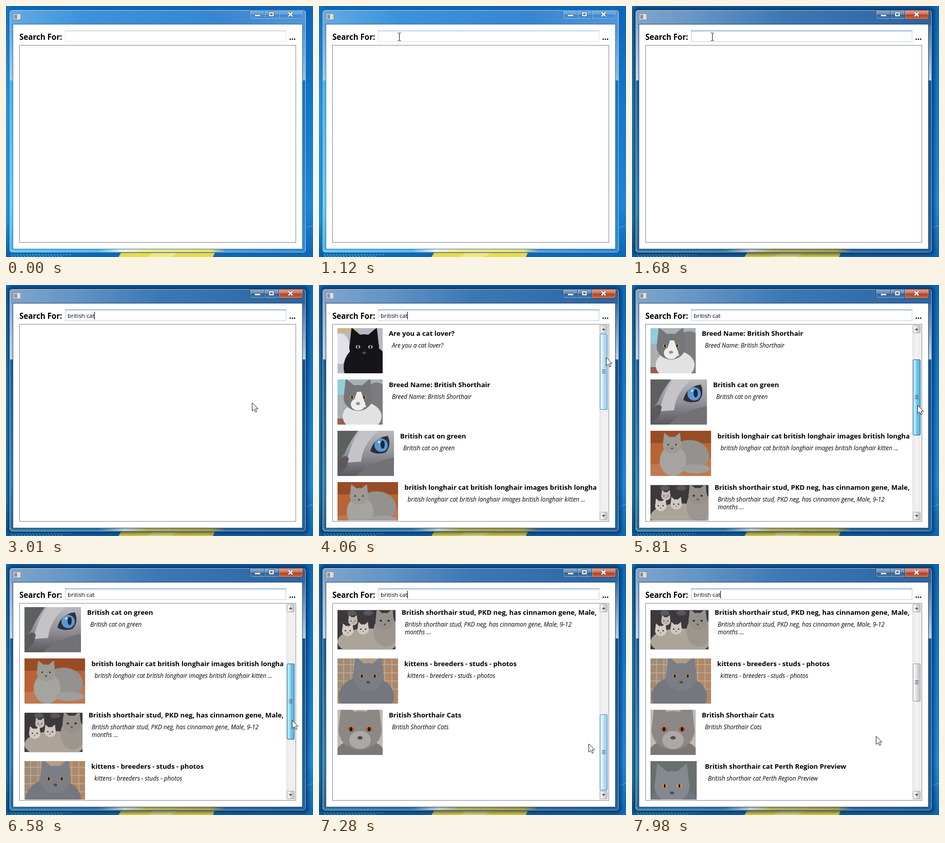
An HTML page that plays this animation: 598x489 px, repeating every 8 s.

```html
<!DOCTYPE html>
<html lang="en">
<head>
<meta charset="utf-8">
<title>Image search</title>
<style>
html, body { margin: 0; width: 100%; height: 100%; overflow: hidden; background: #1478c8; }
#stage { display: block; width: 598px; height: 489px; }
text { font-family: "Open Sans", "Noto Sans", sans-serif; white-space: pre; }
.label { font-weight: 700; font-size: 15.1px; }
.title { font-weight: 700; font-size: 13.15px; }
.note { font-style: italic; font-size: 11.75px; }
.query { font-size: 11.4px; }
</style>
</head>
<body>
<svg id="stage" viewBox="0 0 598 489"></svg>
<script>
const rect = (x, y, w, h, fill, more = '') =>
  `<rect x="${x}" y="${y}" width="${w}" height="${h}" fill="${fill}" ${more}/>`;
const box = (x, y, w, h, fill, stroke, more = '') =>
  rect(x + .5, y + .5, w - 1, h - 1, fill, `stroke="${stroke}" ${more}`);
const oval = (x, y, rx, ry, fill) =>
  `<ellipse cx="${x}" cy="${y}" rx="${rx}" ry="${ry}" fill="${fill}"/>`;
const path = (d, fill, more = '') => `<path d="${d}" fill="${fill}" ${more}/>`;
const text = (x, y, kind, s) => `<text x="${x}" y="${y}" class="${kind}">${s}</text>`;
const group = (id, body, more = '') => `<g id="${id}" ${more}>${body}</g>`;
// Gradient stops are written as "offset colour"; vertical unless across is set.
const grad = (id, stops, across) =>
  `<linearGradient id="${id}" x2="${across ? 1 : 0}" y2="${across ? 0 : 1}">` +
  stops.map(s => s.split(' ')).map(([o, c]) => `<stop offset="${o}" stop-color="${c}"/>`).join('') +
  '</linearGradient>';

const defs = '<defs>' +
  grad('desk', ['0 #0b66b8', '.3 #0f74c8', '.8 #1c86d8', '1 #0c66b4']) +
  grad('deskL', ['0 #1270bc', '.4 #2496de', '.85 #2090d4', '1 #0a5ca4']) +
  grad('idleTitle', ['0 #62ace4', '.25 #3d92da', '.7 #3886d0', '1 #5299da'], 1) +
  grad('liveTitle', ['0 #7fa5cc', '.2 #6596c6', '.5 #3c78b4', '1 #2a66a4'], 1) +
  grad('idleL', ['0 #5aa8e2', '.249 #9cd0f2', '.25 #3fb4ec', '.8 #5ed4f8', '1 #48b8ec']) +
  grad('idleR', ['0 #4c94d8', '.249 #8cc0ea', '.25 #1674c8', '1 #2a90de']) +
  grad('liveL', ['0 #86aed6', '.249 #bcd6ee', '.25 #14609e', '.8 #2a86b8', '1 #256f9c']) +
  grad('liveR', ['0 #3a72ae', '.249 #b8d4ee', '.25 #10549a', '1 #1c68ac']) +
  grad('idleB', ['0 #58ccf4', '.3 #4cb8ec', '.38 #e8f4e8', '.45 #f2ea88', '.68 #eee060', '.73 #4a9ad8', '1 #2a88d8'], 1) +
  grad('liveB', ['0 #2a7ca8', '.3 #2a78ac', '.39 #b8ccd0', '.46 #b0a850', '.68 #a09838', '.73 #2a68a4', '1 #1c60a4'], 1) +
  grad('red', ['0 #dca698', '.48 #c8705c', '.5 #b03c24', '1 #cc6c40']) +
  grad('blue', ['0 #94b4d4', '.48 #5c88b8', '.5 #2a5c94', '1 #4a84bc']) +
  grad('pale', ['0 #7cb4e8', '.48 #5ca0dc', '.5 #3a88d0', '1 #5098dc']) +
  grad('track', ['0 #e6e6e6', '.4 #f2f2f2', '1 #ededed'], 1) +
  grad('rest', ['0 #f6f6f6', '.48 #e8e8ea', '.5 #d8d8dc', '1 #c6c6ca'], 1) +
  grad('hover', ['0 #e8f5fc', '.48 #d4ecf8', '.5 #b4dcf2', '1 #9ccce8'], 1) +
  grad('press', ['0 #c4ebfa', '.48 #9adaf4', '.5 #6cc6ea', '1 #58b4dc'], 1) +
  grad('fur', ['0 #b8b8bc', '.5 #929298', '1 #58585e']) +
  '<clipPath id="rowsClip"><rect x="27" y="78" width="513" height="381"/></clipPath></defs>';

function frame(live) {
  const kind = live ? 'live' : 'idle', edge = live ? '#16283c' : '#27588c';
  const fill = part => `url(#${kind}${part})`;
  const glass = live ? 'url(#blue)' : 'url(#pale)';
  const line = live ? '#24446a' : '#3a72ac';
  const shade = live ? [8, 6, 4, 2].map(n =>
    `<rect x="${6 - n}" y="${7 - n}" width="${578 + 2 * n}" height="${474 + 2 * n}" rx="${6 + n}" fill="#001830" opacity=".13"/>`).join('') : '';
  return shade +
    box(6, 7, 579, 474, fill('Title'), edge, 'rx="6"') +
    rect(8, 36, 5, 438, fill('L')) + rect(578, 36, 5, 438, fill('R')) +
    rect(9, 474, 573, 5, fill('B')) +
    box(7, 8, 577, 472, 'none', '#fff', 'rx="5" stroke-opacity=".55"') +
    box(13, 35, 565, 439, '#fff', live ? '#26405c' : '#3c6c9c') +
    path('M475.5 8V22q0 4 4 4H574q4 0 4-4V8z', glass, `stroke="${line}"`) +
    (live ? path('M531.5 8V25.500H574q4 0 4-4V8z', 'url(#red)', 'stroke="#5c2420"') : '') +
    path('M476.500 8V22q0 3 3 3H574q3 0 3-3V8M504.500 8V25M532.500 8V25', 'none', 'stroke="#fff" stroke-opacity=".4"') +
    path('M503.500 8V26M531.500 8V26', 'none', `stroke="${line}"`) +
    box(484, 16, 12, 5, '#fff', '#4a5a70', 'rx="1"') +
    path('M512 11.500h10v9h-10zM515 14.500h4v3h-4z', '#fff', 'fill-rule="evenodd" stroke="#4a5a70"') +
    path('M550.500 12.500l7.500 7.500m0-7.500l-7.500 7.500', 'none', 'stroke="#4a5a70" stroke-width="4.500"') +
    path('M550.500 12.500l7.500 7.500m0-7.500l-7.500 7.500', 'none', 'stroke="#fff" stroke-width="2.500"');
}

// Simple cat head: ears, face, eyes and nose.
function head(x, y, r, fur, eye, muzzle = fur) {
  return path(`M${x - r} ${y}L${x - r * .85} ${y - r * 1.350}L${x - r * .2} ${y - r * .8}H${x + r * .2}L${x + r * .85} ${y - r * 1.350}L${x + r} ${y}z`, fur) +
    oval(x, y, r, r * .9, fur) + oval(x, y + r * .45, r * .5, r * .42, muzzle) +
    [-1, 1].map(s => oval(x + s * r * .42, y - r * .05, r * .15, r * .11, eye) +
      oval(x + s * r * .42, y - r * .05, r * .06, r * .1, '#181818')).join('') +
    oval(x, y + r * .35, r * .12, r * .08, '#55484c');
}

const bricks = path('M0 12H118M0 28H118M0 44H118M0 60H118M12 0V88M26 0V88M92 0V88M106 0V88', 'none', 'stroke="#c8bcac"');
const rows = [
  { w: 88, x: 136, title: 'Are you a cat lover?',
    art: rect(0, 0, 88, 88, '#b8b8c4') + rect(0, 0, 40, 10, '#c8b888') + oval(6, 40, 18, 30, '#e2e0ea') +
      oval(56, 76, 44, 44, '#16151a') + head(52, 38, 29, '#141418', '#b0b0a4') },
  { w: 88, x: 136, title: 'Breed Name: British Shorthair',
    art: rect(0, 0, 88, 88, '#a8b0b4') + rect(0, 0, 24, 30, '#94ccdc') + rect(0, 76, 88, 12, '#98604c') +
      oval(76, 48, 30, 42, '#7c7c80') + oval(48, 72, 38, 28, '#e2e2e2') +
      head(40, 36, 28, '#75767a', '#b89858', '#efeded') + path('M38 24L46 24L56 54H28z', '#ececec') + oval(40, 47, 4, 3, '#a88c8c') },
  { w: 110, x: 158, title: 'British cat on green',
    art: rect(0, 0, 110, 88, 'url(#fur)') + path('M0 0H40Q22 24 14 44L0 62z', '#5c605e') +
      path('M44 0H80Q50 24 46 60L18 62Q24 28 44 0z', '#c4c4c8') +
      path('M0 62Q14 42 22 54L18 70L0 88z', '#5c585c') + path('M36 88Q62 62 110 52V88z', '#717176') +
      path('M64 40Q70 14 98 10Q106 28 94 42Q78 48 64 40z', '#2c3038') +
      oval(85, 28, 13, 13, '#5c98d4') + oval(88, 27, 4, 8, '#14283c') + oval(81, 22, 2, 2, '#e8f4fc') },
  { w: 118, x: 166.5, title: 'british longhair cat british longhair images british longhair kitten ...',
    art: rect(0, 0, 118, 88, '#b86436') + rect(0, 0, 118, 24, '#984c26') + path('M0 66L118 52V88H0z', '#c07850') +
      oval(76, 48, 38, 30, '#94928e') + oval(44, 58, 26, 30, '#a6a4a0') + oval(88, 74, 28, 9, '#a09e9a') +
      head(42, 28, 18, '#9c9a96', '#d08838') },
  { w: 113, x: 161, h: 77, title: 'British shorthair stud, PKD neg, has cinnamon gene, Male, 9-12 months ...',
    lines: ['British shorthair stud, PKD neg, has cinnamon gene, Male, 9-12', 'months ...'],
    art: rect(0, 0, 113, 77, '#3c383c') + oval(28, 6, 9, 5, '#5c585c') + oval(60, 6, 10, 5, '#58545a') +
      oval(58, 62, 58, 26, '#aca498') + oval(94, 42, 24, 30, '#9c968e') + head(92, 22, 18, '#96908a', '#5c6064') +
      head(30, 22, 9, '#c4bcb4', '#504c50') + head(20, 41, 11, '#d4ccc4', '#504c50') + head(50, 38, 11, '#d0c8c0', '#504c50') },
  { w: 118, x: 166, title: 'kittens - breeders - studs - photos',
    art: rect(0, 0, 118, 88, '#b49c84') + rect(0, 0, 30, 88, '#a08c74') + rect(84, 0, 34, 88, '#b08868') + bricks +
      oval(56, 74, 54, 40, '#74777d') + head(60, 36, 30, '#7b7e85', '#b08448') },
  { w: 88, x: 136, title: 'British Shorthair Cats',
    art: rect(0, 0, 88, 88, '#c0bab0') + oval(44, 82, 46, 24, '#7c7876') + head(44, 40, 42, '#8c8886', '#b85820', '#aca8a4') },
  { w: 90, x: 142, title: 'British shorthair cat Perth Region Preview',
    art: rect(0, 0, 90, 88, '#68706c') + oval(46, 82, 48, 30, '#70747c') + head(42, 50, 34, '#848890', '#e8a030') }
];

function row(r, i) {
  const y = 84 + 100 * i, h = r.h || 88;
  return `<g class="row"><svg x="36" y="${y + (88 - h) / 2}" width="${r.w}" height="${h}">${r.art}</svg>` +
    text(r.x, y + 15, 'title', r.title) +
    (r.lines || [r.title]).map((s, k) => text(r.x + 6, y + 38 + 15 * k, 'note', s)).join('') + '</g>';
}

const arrowKey = (y, d) => box(547, y, 15, 16, 'url(#rest)', '#a4a4a8', 'rx="1"') + path(d, '#505058');

document.getElementById('stage').innerHTML = defs +
  rect(0, 0, 598, 489, 'url(#desk)') + rect(0, 0, 8, 489, 'url(#deskL)') +
  path('M226 478H408L403 489H219z', '#e8da48') + path('M290 478H340L322 489H276z', '#f2e878') +
  path('M10 484.500H130M12 487.500H110', 'none', 'stroke="#4cacdc" stroke-width="2" stroke-dasharray="1 5" stroke-linecap="round"') +
  path('M585 432L598 427', 'none', 'stroke="#58b0ec"') +
  group('idle', frame(false)) + group('live', frame(true)) +
  box(14, 15, 15, 12, '#f4f4f4', '#8c9098') + rect(16, 17, 6, 8, '#8e9296') + rect(24, 17, 3, 8, '#d0d2d4') +
  text(26, 66, 'label', 'Search For:') + text(551.5, 65.5, 'label', '...') +
  rect(115, 48, 431, 22, '#fff') +
  group('rim', box(115, 48, 431, 22, 'none', 'currentColor', 'stroke-opacity=".36"') + rect(115, 48, 431, 1, 'currentColor')) +
  text(120, 64, 'query', '<tspan id="query"></tspan>') +
  rect(0, 52, 1, 15, '#000', 'id="caret"') +
  box(26, 76, 539, 385, '#fff', '#828790') +
  group('results',
    `<g clip-path="url(#rowsClip)">${group('rows', rows.map(row).join(''))}</g>` +
    rect(546, 78, 17, 381, 'url(#track)') +
    arrowKey(78, 'M551 88L554.500 84L558 88z') + arrowKey(442, 'M551 448L554.500 452L558 448z') +
    '<rect id="thumb" x="547.500" width="14" rx="1.500"/>' +
    group('grip', path('M551 -3.500h7M551 -.5h7M551 2.500h7', 'none', 'stroke="#404854"'))) +
  group('arrow', path('M.5.5V16.500L4.500 13L7 18.500L9.500 17.500L7 12H12z', '#fff', 'stroke="#20242c"')) +
  group('beam', path('M-3 -7.500H-1L0 -7L1 -7.500H3M0 -7V7M-3 7.500H-1L0 7L1 7.500H3', 'none', 'stroke="#101010"'));

const el = id => document.getElementById(id);
const show = (node, on) => { node.style.display = on ? '' : 'none'; };
const move = (id, x, y) => el(id).setAttribute('transform', `translate(${x} ${y})`);

// Pointer track: time, x, y
const track = [[280, 400, 440], [560, 323, 335], [700, 268, 275], [910, 173, 110], [1050, 156, 60],
  [2170, 156, 60], [2380, 340, 150], [2660, 479, 229], [3570, 479, 229], [4060, 559, 141],
  [4270, 559, 150], [4480, 558, 153], [5250, 555, 202], [5390, 555, 208], [6230, 557, 259],
  [6580, 557, 304], [7070, 557, 353], [7140, 550, 357], [7560, 475, 335]];

function pointer(t) {
  const i = track.findIndex(p => p[0] > t);
  if (i === 0) return track[0].slice(1);
  if (i < 0) return track[track.length - 1].slice(1);
  const [a, x, y] = track[i - 1], [b, u, v] = track[i], k = (t - a) / (b - a);
  return [Math.round(x + (u - x) * k), Math.round(y + (v - y) * k)];
}

const skins = { rest: '#96969c', hover: '#4488b4', press: '#1c6490' };

function draw(t) {
  const [x, y] = pointer(t);
  const inBox = x > 115 && x < 546 && y > 48 && y < 70;
  const live = t >= 1190, typed = t >= 2100;
  show(el('idle'), !live);
  show(el('live'), live);
  el('rim').style.color = live ? '#3d7bad' : inBox ? '#7eb4dc' : '#b4b8c4';
  el('query').textContent = typed ? 'british cat' : '';
  show(el('caret'), typed ? Math.floor((t - 3010) / 493) % 2 === 0 : live && t < 1680);
  el('caret').setAttribute('x', typed ? 172 : 120);

  // The list scrolls by whole items, three to a page; reaching the end loads more.
  const count = t < 7910 ? 7 : 14, rail = 347, h = rail * 3 / count;
  const dragY = pointer(Math.min(t, 7140))[1];
  const first = t < 4480 ? 0 : Math.max(0, Math.min(4, Math.floor((dragY - 157) / 49.6)));
  const top = Math.round(95 + (rail - h) * first / (count - 3));
  const skin = t >= 4480 && t <= 7140 ? 'press' : x > 546 || (t > 7140 && t < 7700) ? 'hover' : 'rest';
  show(el('results'), t >= 3220);
  move('rows', 0, -100 * first);
  document.querySelectorAll('.row').forEach((r, i) => show(r, i < count));
  const thumb = el('thumb');
  thumb.setAttribute('y', top + .5);
  thumb.setAttribute('height', Math.floor(h) - 1);
  thumb.setAttribute('fill', `url(#${skin})`);
  thumb.setAttribute('stroke', skins[skin]);
  move('grip', 0, Math.round(top + h / 2));

  show(el('arrow'), t >= 280 && !inBox);
  show(el('beam'), inBox);
  move('arrow', x, y);
  move('beam', x + .5, y);
}

const start = performance.now();
function tick() {
  const t = (performance.now() - start) % 8000;
  draw(Math.floor(t / 70) * 70);
  requestAnimationFrame(tick);
}
tick();
</script>
</body>
</html>
```
